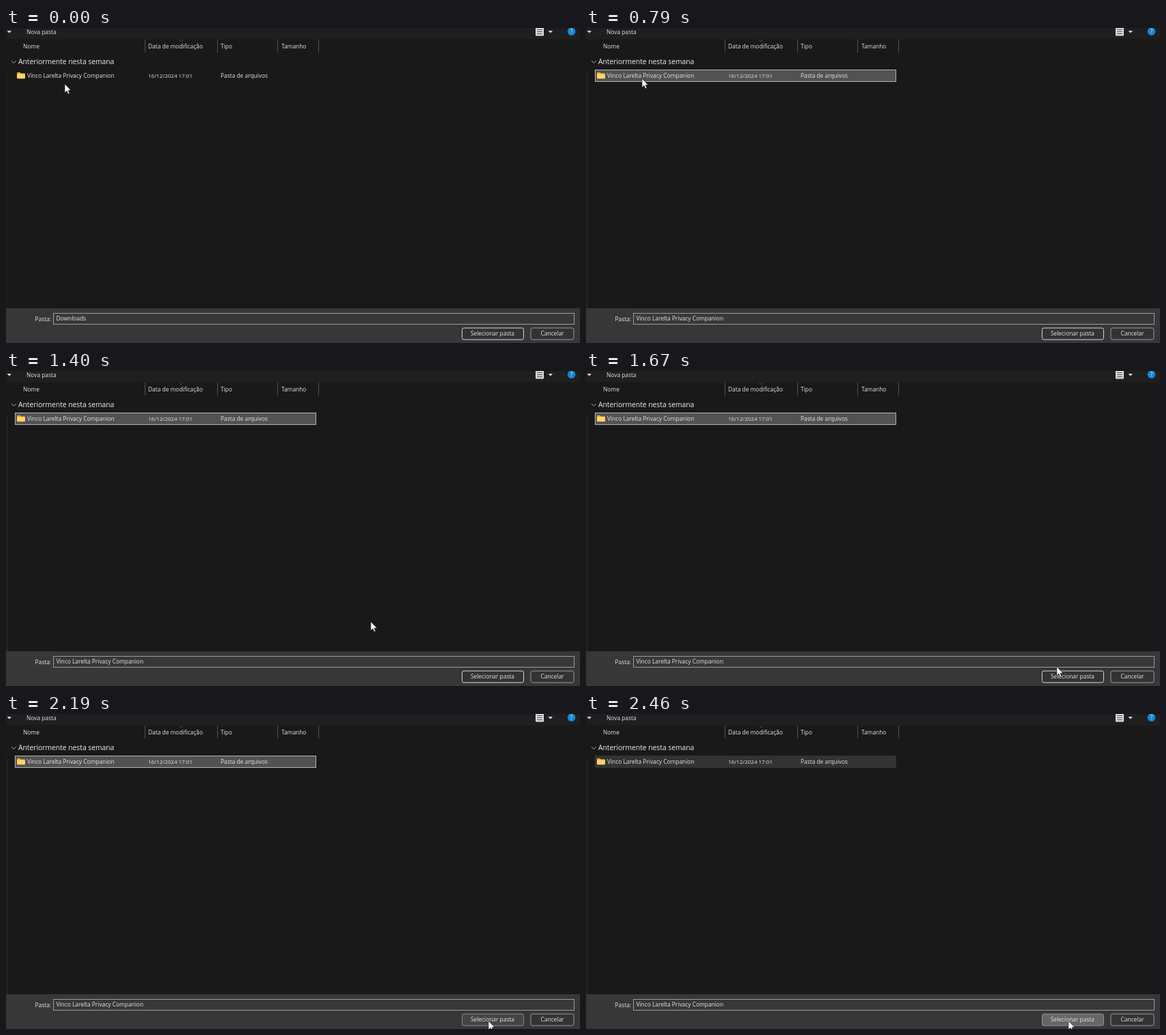
Recreate the animation shown at these times as an HTML page. Size 840x462 px, loop 2.52 s.

```html
<!DOCTYPE html>
<html lang="pt-BR">
<head>
<meta charset="utf-8">
<style>
  html, body { margin: 0; height: 100%; overflow: hidden; background: #191919; }
  svg { display: block; width: 840px; height: 462px; }
  text { font: 8.4px "Open Sans", "Noto Sans", sans-serif; fill: #e4e4e4; }
  .group { font-size: 10.3px; fill: #f0f0f0; }
  .date { font-size: 8px; }
  .line { fill: none; stroke: #505050; }
</style>
</head>
<body>
<svg viewBox="0 0 840 462">
  <rect width="840" height="462" fill="#191919"/>
  <rect width="840" height="16.5" fill="#1f1f1f"/>
  <path id="edge" class="line" d="M1.5 66V411"/>

  <path d="M1.5 4h6.5l-3.2 3.5zM793.5 4h6.5l-3.2 3.5z" fill="#d8d8d8"/>
  <text x="30" y="8.6">Nova pasta</text>
  <rect x="775" y="-1" width="12" height="12.5" rx="1" fill="#dcdcdc"/>
  <path d="M777 2.5h8M777 5.5h8M777 8.5h8" stroke="#4a4a4a"/>
  <circle cx="827.5" cy="5.2" r="5.8" fill="#1487d8"/>
  <text x="827.5" y="8.4" text-anchor="middle">?</text>

  <path class="line" d="M203.5 17V36M309.5 17V36M397.5 17V36M457.5 17V36"/>
  <path class="line" d="M253.5 17.5l2.8 2.5 2.8-2.5"/>
  <text x="25" y="30">Nome</text>
  <text x="208" y="30">Data de modificação</text>
  <text x="314" y="30">Tipo</text>
  <text x="403" y="30">Tamanho</text>

  <path d="M8 48l3.5 3.5 3.5-3.5" fill="none" stroke="#aaa"/>
  <text class="group" x="18" y="53.4">Anteriormente nesta semana</text>

  <rect id="row" x="13.5" y="61.5" width="440" height="17"/>
  <path d="M16 66q0-1 1-1h3.5l1.5 1.5h5q1 0 1 1V69H16z" fill="#e0a52c"/>
  <rect x="16" y="67.3" width="12" height="7" rx="1" fill="#ffd567"/>
  <text class="name" x="31" y="73.3"></text>
  <text class="date" x="208" y="73.3">16/12/2024 17:01</text>
  <text x="314" y="73.3">Pasta de arquivos</text>

  <rect y="411" width="840" height="51" fill="#373737"/>
  <text x="42.5" y="429.8">Pasta:</text>
  <rect x="69.5" y="418.5" width="762" height="16" fill="#383838" stroke="#9c9c9c"/>
  <text id="field" x="73.5" y="429.3"></text>
  <rect id="ok" x="667.5" y="440" width="90" height="17" rx="2.5"/>
  <text x="712" y="451.4" text-anchor="middle">Selecionar pasta</text>
  <rect x="768" y="440" width="63" height="17" rx="2.5" fill="#333" stroke="#9a9a9a"/>
  <text x="799.5" y="451.4" text-anchor="middle">Cancelar</text>

  <path id="cursor" d="M0 0V13l3-2.7 2 4.5 2-.9-2-4.3h4z" fill="#fff" stroke="#111" stroke-width=".6"/>
</svg>
<script>
const LOOP = 2520, FPS = 15;
const FOLDER = "Vinco Larelta Privacy Companion";
// Pointer keys: time in ms, x, y
const KEYS = [
  [0, 86, 82], [580, 86, 82], [590, 82, 73], [860, 82, 75], [1070, 162, 153],
  [1400, 541, 371], [1600, 681, 430], [1860, 703, 441], [2100, 706, 450], [LOOP, 706, 450]
];
const $ = id => document.getElementById(id);
document.querySelector(".name").textContent = FOLDER;

const slope = (i, axis) => (KEYS[i + 1][axis] - KEYS[i][axis]) / (KEYS[i + 1][0] - KEYS[i][0]);

// Harmonic mean keeps the curve from overshooting
function tangent(i, axis) {
  if (i === 0 || i === KEYS.length - 1) return 0;
  const a = slope(i - 1, axis), b = slope(i, axis);
  return a * b > 0 ? 2 * a * b / (a + b) : 0;
}

function pointer(t, axis) {
  let i = 0;
  while (i < KEYS.length - 2 && t >= KEYS[i + 1][0]) i++;
  const [a, b] = [KEYS[i], KEYS[i + 1]], span = b[0] - a[0];
  const u = (t - a[0]) / span, v = 1 - u;
  return a[axis] * v * v * (1 + 2 * u) + b[axis] * u * u * (3 - 2 * u)
    + span * u * v * (v * tangent(i, axis) - u * tangent(i + 1, axis));
}

function paint(el, fill, stroke) {
  el.setAttribute("fill", fill);
  el.setAttribute("stroke", stroke);
}

function draw(now) {
  const clock = now % LOOP;
  const step = Math.floor((clock + 10) * FPS / 1000);
  const t = Math.max(0, step * 1000 / FPS - 8);
  const selected = step >= 12;

  if (step < 9) paint($("row"), "none", "none");
  else if (!selected) paint($("row"), "#4d4d4d", "#4d4d4d");
  else if (step < 35) paint($("row"), "#525252", "#b4b4b4");
  else paint($("row"), "#333", "#333");

  if (step < 32) paint($("ok"), "#333", "#d6d6d6");
  else if (step < 34) paint($("ok"), "#444", "#8c8c8c");
  else paint($("ok"), step < 35 ? "#555" : "#666", "#929292");

  $("edge").style.stroke = selected ? "#2d2d2d" : "#1d1d1d";
  $("field").textContent = selected ? FOLDER : "Downloads";
  $("cursor").setAttribute("transform", `translate(${pointer(t, 1)} ${pointer(t, 2)})`);
  requestAnimationFrame(draw);
}
requestAnimationFrame(draw);
</script>
</body>
</html>
```
